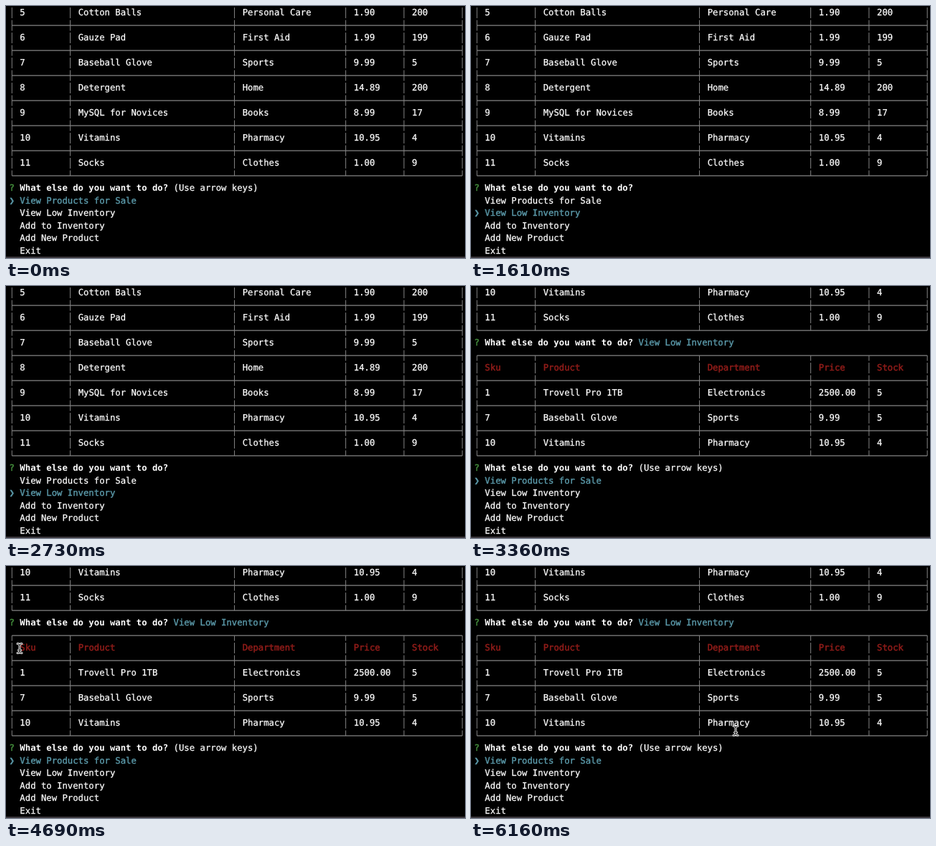
These frames come from a looping animation (640 by 352 pixels, 6.23 s). An HTML page:

```html
<!DOCTYPE html>
<html lang="en">
<head>
<meta charset="utf-8">
<title>Inventory terminal</title>
<style>
  html, body { margin: 0; width: 100%; height: 100%; overflow: hidden; background: #000; }
  svg { display: block; width: 640px; height: 352px; }
  text {
    --ink: #fff;
    font: 12.27px "DejaVu Sans Mono", "Liberation Mono", monospace;
    fill: var(--ink); stroke: var(--ink); stroke-width: 0.25;
    white-space: pre; text-rendering: geometricPrecision;
  }
  .bold { font-weight: bold; stroke: none; }
  .green { --ink: #438c3c; stroke-width: 0.5; }
  .cyan { --ink: #5a98a8; stroke-width: 0.4; }
  .red { --ink: #8f1c19; stroke-width: 0.5; }
  .grid { stroke: #848484; stroke-width: 1; fill: none; }
  .rule { stroke-width: 1.4; }
</style>
</head>
<body>
<svg id="stage" viewBox="0 0 640 352"></svg>
<script>
const LOOP = 6230, TICK = 70;
const CELL = 7.387, LEFT = 4.6, ROW = 17.5, TOP = 9;
const COLS = [2, 13, 44, 65, 76];
const BARS = [0.5, 11.5, 42.5, 63.5, 74.5, 85.5];
const QUESTION = "What else do you want to do?";
const OPTIONS = ["View Products for Sale", "View Low Inventory", "Add to Inventory", "Add New Product", "Exit"];
const HEAD = ["Sku", "Product", "Department", "Price", "Stock"];
const VITAMINS = ["10", "Vitamins", "Pharmacy", "10.95", "4"];
const SOCKS = ["11", "Socks", "Clothes", "1.00", "9"];
const GLOVE = ["7", "Baseball Glove", "Sports", "9.99", "5"];
const STOCK = [
  ["5", "Cotton Balls", "Personal Care", "1.90", "200"],
  ["6", "Gauze Pad", "First Aid", "1.99", "199"],
  GLOVE,
  ["8", "Detergent", "Home", "14.89", "200"],
  ["9", "MySQL for Novices", "Books", "8.99", "17"],
  VITAMINS, SOCKS
];
const LOW = [["1", "Trovell Pro 1TB", "Electronics", "2500.00", "5"], GLOVE, VITAMINS];

const stage = document.getElementById("stage");
const colX = c => LEFT + c * CELL;
const rowY = r => TOP + r * ROW;
const lineY = r => rowY(r) + 0.6;

function add(parent, tag, attrs = {}, text) {
  const node = document.createElementNS("http://www.w3.org/2000/svg", tag);
  for (const key in attrs) node.setAttribute(key, attrs[key]);
  if (text) node.textContent = text;
  parent.append(node);
  return node;
}

const write = (parent, col, row, text, cls = "") =>
  add(parent, "text", { x: colX(col), y: rowY(row) + 4.4, class: cls }, text);

// Every terminal line holds its own short piece of each vertical bar.
function bars(parent, row, up = 7.5, down = 7.5) {
  const y = lineY(row);
  const d = BARS.map(b => `M${colX(b)} ${y - up}V${y + down}`).join("");
  add(parent, "path", { d, class: "grid" });
}

function rule(parent, row, up, down) {
  const d = `M${colX(BARS[0])} ${lineY(row)}H${colX(BARS[5])}`;
  add(parent, "path", { d, class: "grid rule" });
  bars(parent, row, up, down);
}

function table(parent, start, rows, cls = () => "") {
  rows.forEach((cells, i) => {
    const row = start + i * 2;
    cells.forEach((text, c) => write(parent, COLS[c], row, text, cls(i)));
    bars(parent, row);
    if (i < rows.length - 1) rule(parent, row + 1);
    else rule(parent, row + 1, 7.5, 0);
  });
}

function question(parent, row) {
  write(parent, 0, row, "?", "green");
  write(parent, 2, row, QUESTION, "bold");
}

const full = add(stage, "g");
table(full, 0, STOCK);

const low = add(stage, "g");
table(low, 0, [VITAMINS, SOCKS]);
question(low, 4);
write(low, 31, 4, OPTIONS[1], "cyan");
rule(low, 5, 0, 7.5);
table(low, 6, [HEAD, ...LOW], i => i ? "" : "red");

question(stage, 14);
const hint = write(stage, 31, 14, "(Use arrow keys)");
const pointer = write(stage, 0, 15, "❯", "cyan");
const items = OPTIONS.map((text, i) => write(stage, 2, 15 + i, text));
add(stage, "rect", { x: 0, y: 350, width: 640, height: 2, fill: "#39363b" });

const arrow = add(stage, "g");
add(arrow, "path", {
  d: "M0 0V12.6L2.9 9.9L5 14.8L7.2 13.8L5.1 9.1H9Z",
  fill: "#000", stroke: "#fff", "stroke-width": 1.1
});
const ring = add(stage, "g", { fill: "none", stroke: "#d8d8d8", "stroke-width": 1.1 });
for (const r of [19.3, 17]) add(ring, "circle", { cx: 277, cy: 295, r });

const beam = add(stage, "g", { fill: "none", "stroke-linecap": "round" });
for (const [stroke, width] of [["#f0f0f0", 3], ["#222", 1]]) {
  add(beam, "path", {
    d: "M-3-6.5Q0-6.5 0-4Q0-6.5 3-6.5M0-4V4M-3 6.5Q0 6.5 0 4Q0 6.5 3 6.5M-1.5 2.5H1.5",
    stroke, "stroke-width": width
  });
}

// [time, x, y]
const ARROW_PATH = [[70, 345, 354], [630, 277, 294], [910, 277, 294]];
const BEAM_PATH = [
  [3780, 277, 295], [4340, 363, 197], [4690, 19, 115], [4970, 19, 115],
  [5180, 250, 255], [5390, 435, 198], [5950, 435, 198], [6070, 400, 234],
  [6160, 369, 230], [LOOP, 369, 230]
];
// [time, selected option, hint shown, low table shown]
const STEPS = [[0, 0, 1, 0], [1470, 1, 0, 0], [1750, 2, 0, 0], [2310, 1, 0, 0], [3220, 0, 1, 1]];

const show = (node, on) => node.setAttribute("visibility", on ? "visible" : "hidden");

function place(node, path, t) {
  const next = path.findIndex(p => p[0] > t);
  show(node, next > 0);
  if (next < 1) return;
  const [t0, x0, y0] = path[next - 1], [t1, x1, y1] = path[next];
  const u = (t - t0) / (t1 - t0), e = u * u * (3 - 2 * u);
  node.setAttribute("transform", `translate(${x0 + (x1 - x0) * e} ${y0 + (y1 - y0) * e})`);
}

function draw(now) {
  const t = Math.floor((now % LOOP) / TICK) * TICK;
  const [, pick, hinted, lowShown] = STEPS.filter(s => s[0] <= t).pop();
  show(full, !lowShown);
  show(low, lowShown);
  show(hint, hinted);
  pointer.setAttribute("y", rowY(15 + pick) + 4.4);
  items.forEach((item, i) => item.setAttribute("class", i === pick ? "cyan" : ""));
  place(arrow, ARROW_PATH, t);
  show(ring, t >= 700 && t < 910);
  place(beam, BEAM_PATH, t);
}

const began = performance.now();
function loop() {
  draw(performance.now() - began);
  requestAnimationFrame(loop);
}
loop();
</script>
</body>
</html>
```
